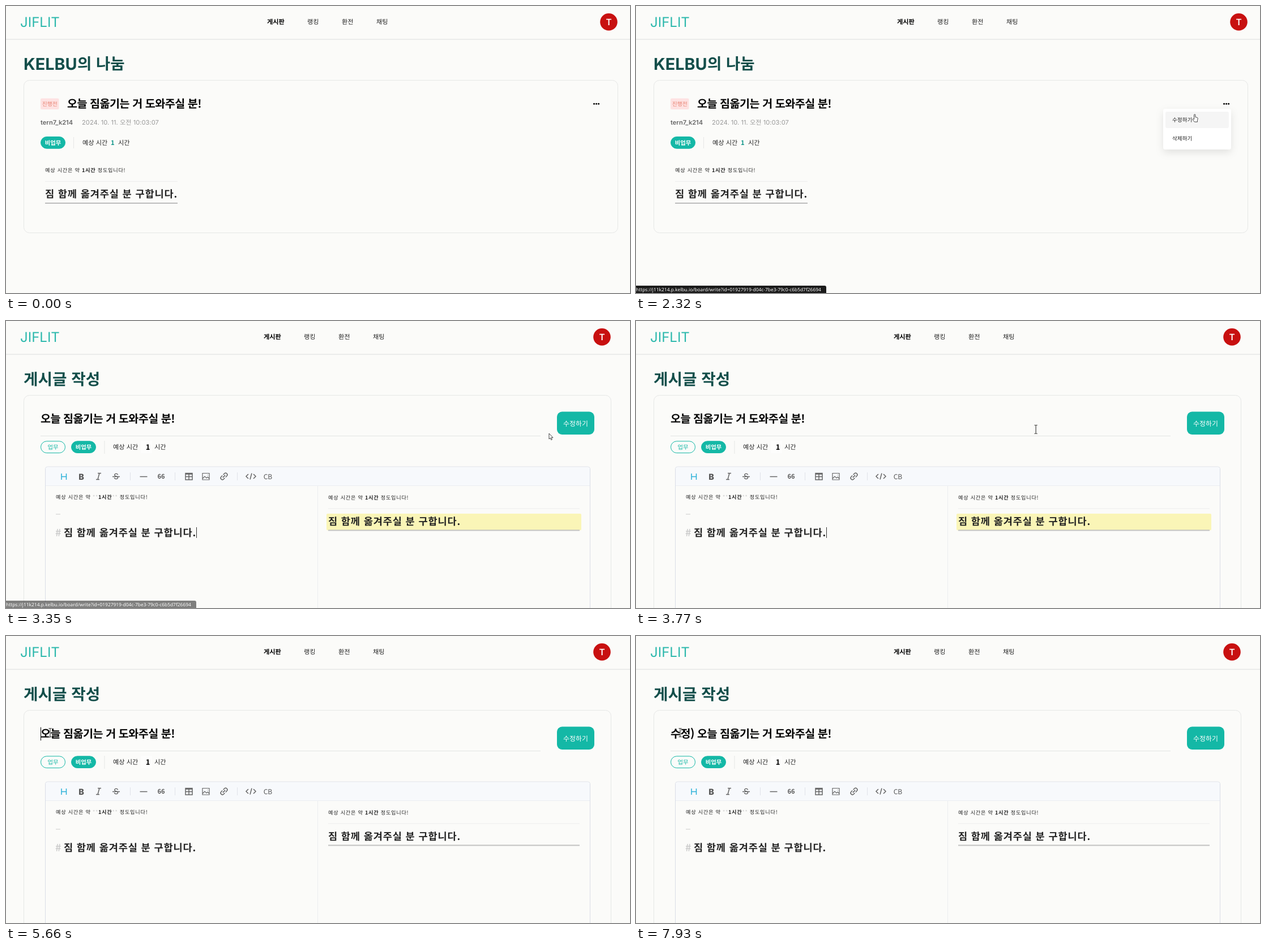
An HTML page that plays this animation: 1102 by 508 pixels, repeating every 8000 ms.

```html
<!DOCTYPE html>
<html lang="ko">
<head>
<meta charset="utf-8">
<style>
  html, body { margin: 0; width: 100%; height: 100%; overflow: hidden; background: #fbfbf9; }
  svg { display: block; width: 1102px; height: 508px; }
  text { font-family: "Noto Sans CJK KR", "Noto Sans CJK", sans-serif; text-rendering: geometricPrecision; }
  .latin { font-family: Inter, "Noto Sans CJK KR", "Noto Sans CJK", sans-serif; }
  .url { font-family: "Noto Sans", "Open Sans", sans-serif; }
  .title { font-weight: 700; letter-spacing: -.5px; }
  .icon { fill: none; stroke: #666; stroke-width: 1.5; }
  .pointer { fill: #fff; stroke: #333; stroke-width: .9; stroke-linejoin: round; }
  #ibeam { mix-blend-mode: difference; }
  #click { mix-blend-mode: multiply; }
</style>
</head>
<body>
<svg id="stage" viewBox="0 0 1102 508" xmlns="http://www.w3.org/2000/svg"></svg>
<script>
const LOOP = 8000, STEP = 70;
const TEAL = '#14b8a6', DARK_TEAL = '#134e4a', RULE = '#e6e7e6';
const POST_TITLE = '오늘 짐옮기는 거 도와주실 분!';
const HEADING = '짐 함께 옮겨주실 분 구합니다.';

// Text is placed by the middle of its glyphs.
const text = (x, midY, size, content, color = '#222', extra = '') =>
  `<text x="${x}" y="${midY + size * .38}" font-size="${size}" fill="${color}" ${extra}>${content}</text>`;
const bold = 'font-weight="700"';
const centered = 'text-anchor="middle"';
const rect = (x, y, w, h, fill, extra = '') =>
  `<rect x="${x}" y="${y}" width="${w}" height="${h}" fill="${fill}" ${extra}/>`;
const outline = (x, y, w, h, r, color = RULE) =>
  rect(x, y, w, h, 'none', `rx="${r}" stroke="${color}"`);
const group = (id, content) => `<g id="${id}">${content}</g>`;

const pill = (x, y, label, filled) =>
  rect(x + .5, y + .5, 43, 20.7, filled ? TEAL : 'none', `rx="10.35" stroke="${TEAL}"`) +
  text(x + 22, y + 10.8, 10.3, label, filled ? '#fff' : TEAL, `${centered} ${filled ? bold : ''}`);

const sentence = (x, y, mark = '') => {
  const stars = mark && `<tspan fill="#ccc" font-weight="400">${mark}</tspan>`;
  return text(x, y, 9.2,
    `예상 시간은 약 ${stars}<tspan font-weight="700">1시간</tspan>${stars} 정도입니다!`,
    '#222', 'letter-spacing=".72"');
};
const heading = (x, y) => text(x, y, 17.6, HEADING, '#222', `${bold} letter-spacing=".85"`);

const nav = group('nav',
  text(461, 28, 11.2, '게시판', '#000', bold) +
  ['랭킹', '환전', '채팅'].map((label, i) => text(532 + 61 * i, 28, 11.2, label)).join(''));
const avatar = group('avatar',
  '<circle cx="1064.5" cy="28.3" r="15.3" fill="#c81010"/>' +
  text(1064.5, 28.2, 15.5, 'T', '#fff', `class="latin" font-weight="600" ${centered}`));
const header =
  text(25, 28, 24, 'JIFLIT', '#2bb8ac', 'class="latin" font-weight="400"') + nav + avatar +
  rect(0, 58.5, 1102, 1, '#dcdedd');

const menu = group('menu',
  rect(931, 182, 120, 72, '#fff', 'rx="4" filter="url(#shadow)"') +
  group('hover', rect(935, 187, 112, 29, '#f5f5f5', 'rx="3"')) +
  text(947, 201.5, 9.6, '수정하기') + text(947, 234, 9.6, '삭제하기'));

const viewPage = group('view',
  text(31, 102, 28.8, 'KELBU', DARK_TEAL, `class="latin" ${bold}`) +
  text(126, 102, 27.5, '의 나눔', DARK_TEAL, bold) +
  outline(31.5, 131.5, 1049, 270, 10) +
  rect(61, 163.5, 32.5, 19.5, '#fee2e2', 'rx="2"') +
  text(77.3, 173.3, 9.8, '진행전', '#e88474', centered) +
  text(108, 173, 19.6, POST_TITLE, '#000', 'class="title"') +
  [1038.6, 1042.6, 1046.6].map(x => `<circle cx="${x}" cy="173.2" r="1.45"/>`).join('') +
  text(61, 206, 11.1, 'tern7_k214', '#666', 'class="latin" font-weight="600"') +
  text(134, 206, 11.2, '2024. 10. 11. 오전 10:03:07', '#999', 'class="latin"') +
  pill(61, 231, '비업무', true) + rect(119, 232, 1, 20, RULE) +
  text(135, 242, 11.2, '예상 시간') + text(185, 242, 11.2, '1', '#0d9488', bold) + text(198, 242, 11.2, '시간') +
  sentence(69, 291) + rect(69, 310, 234, 1, '#ededed') +
  heading(69, 332) + rect(69, 348, 234, 2, '#bdbdbd') + menu);

const label = (x, size, content, extra = '') => text(x, 275, size, content, '#555', `${centered} ${extra}`);
const toolbar =
  '<path class="icon" style="stroke:#2bb1d8" d="M98 270v11M106.5 270v11M98 275.5h8.5"/>' +
  label(133, 14.5, 'B', 'class="latin" font-weight="800"') +
  '<path class="icon" d="M162 269.5h6M159 280.5h6M165 269.5l-3 11"/>' +
  label(194.5, 14, 'S', 'class="latin"') + '<path class="icon" d="M188 275.5h13"/>' +
  '<path class="icon" d="M236.5 275.5h13"/>' +
  label(274, 11, '66', bold) +
  '<path class="icon" d="M317 269.5h12v11.5h-12zM317 271h12M317 275.5h12M323 271v10"/>' +
  '<path class="icon" style="stroke-width:1.2" d="M347 269.5h12v11.5h-12zM347 279l4-4 3 3 2-2 3 3M355.5 272.5h1"/>' +
  '<g transform="rotate(-45 385 275)"><path class="icon" d="M384 272h-3a3 3 0 0 0 0 6h3M386 272h3a3 3 0 0 1 0 6h-3M382 275h6"/></g>' +
  '<path class="icon" d="M428 271l-4 4 4 4M437 271l4 4-4 4M434 269.5l-3 11"/>' +
  label(462.5, 12, 'CB', 'font-weight="500"') +
  [219, 298, 408].map(x => rect(x, 268, 1, 14, '#e1e3e9')).join('');

const editor = group('editor',
  '<path d="M69.5 520V262q0-4 4-4H1027.5q4 0 4 4V520" fill="none" stroke="#dadde6"/>' +
  '<path d="M70 291V262q0-3.5 3.5-3.5H1027.5q3.5 0 3.5 3.5V291z" fill="#f7f9fc"/>' +
  rect(70, 291, 961, 1, '#ebedf2') + rect(550, 291, 1, 217, '#eceef0') + toolbar +
  sentence(88, 312, '**') + rect(88, 341.5, 8, 1, '#ccc') +
  text(87, 374, 17.6, '#', '#ccc', bold) + heading(102, 374) +
  group('editorCaret', rect(336, 365, 1, 19, '#333')) +
  sentence(569, 312.5) + rect(569, 331.5, 444, 1, '#ededed') +
  group('mark', rect(566, 341, 450, 29.5, '#faf5b7', 'rx="2"')) +
  heading(569, 354) + rect(569, 369.5, 444, 2, '#c2c2c2'));

const editPage = group('edit',
  text(31, 102, 27.7, '게시글 작성', DARK_TEAL, bold) +
  '<rect id="card" x="31.5" y="131.5" rx="10" fill="none" stroke="#e6e7e6"/>' +
  text(61, 173, 19.6, POST_TITLE, '#000', 'class="title" id="title"') +
  '<rect id="composing" y="184" height="1"/><rect id="titleCaret" y="161.5" width="1" height="23.5"/>' +
  '<rect id="titleRule" x="61" y="203" height="1" fill="#e3e4e4"/>' +
  group('submit', rect(973, 160.5, 66, 40.5, TEAL, 'rx="9"') +
    text(1006, 181, 11.9, '수정하기', '#fff', `${centered} font-weight="500"`)) +
  pill(61, 212.3, '업무', false) + pill(115, 212.3, '비업무', true) + rect(173.5, 212, 1, 23, RULE) +
  text(189, 223, 11.2, '예상 시간') + rect(238, 212, 20, 22, '#fdfdfc') +
  text(250.5, 223, 13, '1', '#000', `${bold} ${centered}`) + text(262, 223, 11.2, '시간') + editor);

const status = group('status',
  '<path d="M0 495H333q3 0 3 3V508H0z" fill="#1b1b1b"/>' +
  text(0, 502.2, 8.4, 'https://j11k214.p.kelbu.io/board/write?id=01927919-d04c-7be3-79c0-c6b5d7f26694', '#fff', 'class="url"'));

const pointer = group('pointer',
  '<circle id="click" cx="1" cy="1" r="9.5" fill="#f7ec3c"/>' +
  '<path id="arrow" class="pointer" d="M0 0V10L2.3 8 3.8 11.5 5.4 10.8 4 7.4H7z"/>' +
  '<path id="hand" class="pointer" d="M0 1.2a1.1 1.1 0 0 1 2.2 0V5l3 .7q1.6.4 1.4 2L5.8 11V13.5H.8L-3 9q.4-1.6 3-.2z"/>' +
  '<path id="ibeam" fill="none" stroke="#ddd" d="M-2.5-7.5h2l.5.5.5-.5h2M0-7V7M-2.5 7.5h2l.5-.5.5.5h2"/>');

const stage = document.getElementById('stage');
stage.innerHTML =
  '<defs><filter id="shadow" x="-30%" y="-40%" width="160%" height="190%">' +
  '<feDropShadow dx="0" dy="5" stdDeviation="7" flood-opacity=".1"/></filter></defs>' +
  header + viewPage + editPage + status + pointer;

const parts = Object.fromEntries([...stage.querySelectorAll('[id]')].map(el => [el.id, el]));
const show = (id, on) => { parts[id].style.display = on ? '' : 'none'; };
const attr = (id, values) => { for (const k in values) parts[id].setAttribute(k, values[k]); };
const shift = (id, x, y = 0) => attr(id, { transform: `translate(${x} ${y})` });
const within = (t, ...spans) => spans.some(([from, to]) => t >= from && t < to);

// [start, end, x, y]: the pointer eases to x, y between start and end.
const MOVES = [
  [660, 660, 1000, 488], [660, 1360, 1048.5, 174], [1830, 2600, 963, 198], [2730, 2730, 964, 198],
  [3280, 3350, 959, 199], [3350, 4460, 76, 174], [4590, 4660, 72, 169], [5130, 5330, 78, 171],
];
const TYPED = [
  [0, ''], [6060, 'ㅅ'], [6130, '수'], [6200, '숮'], [6330, '수저'], [6400, '수정'],
  [6600, '수정))'], [7060, '수정)'], [7400, '수정) '],
];
const ease = p => p < .5 ? 2 * p * p : 1 - 2 * (1 - p) ** 2;

function pointerAt(t) {
  let pos = [1000, 488];
  for (const [start, end, x, y] of MOVES) {
    if (t < start) break;
    const stepped = Math.floor((t - start) / STEP) * STEP;
    const p = t >= end ? 1 : ease(stepped / (end - start));
    pos = [pos[0] + (x - pos[0]) * p, pos[1] + (y - pos[1]) * p];
  }
  return pos;
}

function drawTitle(t) {
  const prefix = TYPED.filter(([at]) => t >= at).pop()[1];
  const value = prefix + POST_TITLE;
  if (parts.title.textContent !== value) parts.title.textContent = value;
  const xAfter = n => 61 + (n > 0 ? parts.title.getSubStringLength(0, n) : 0);
  const count = t < 5130 ? 1 : prefix.length;
  show('titleCaret', within(t, [4730, 5130], [5660, 7930]));
  attr('titleCaret', { x: Math.round(xAfter(count)) });
  show('composing', within(t, [6060, 6600]));
  const left = xAfter(count - 1);
  attr('composing', { x: left, width: Math.max(0, xAfter(count) - left) });
}

function draw(t) {
  const editing = t >= 3000, loaded = t >= 3280;
  show('view', !editing);
  show('edit', editing);
  show('editor', loaded);
  shift('nav', loaded ? -6 : 0);
  shift('avatar', loaded ? -12 : 0);
  shift('submit', loaded ? 0 : 12);
  attr('card', { width: loaded ? 1037 : 1049, height: loaded ? 420 : 134 });
  attr('titleRule', { width: loaded ? 883 : 895 });
  if (editing) drawTitle(t);

  show('menu', within(t, [1560, 3000]));
  show('hover', t >= 2180);
  show('status', within(t, [2320, 3420]));
  parts.status.style.opacity = t >= 3350 ? .55 : 1;
  show('mark', t < 4800);
  show('editorCaret', within(t, [3280, 3800], [4330, 4800]));

  const [x, y] = pointerAt(t);
  const hand = within(t, [1290, 1900], [2180, 3280]);
  const ibeam = loaded && x < 944 && y < 202;
  show('pointer', t >= 660);
  shift('pointer', x, y);
  show('hand', hand);
  show('ibeam', ibeam);
  show('arrow', !hand && !ibeam);
  show('click', within(t, [1490, 1630], [2930, 3000], [4730, 4860]));
}

const start = performance.now();
function tick() {
  draw((performance.now() - start) % LOOP);
  requestAnimationFrame(tick);
}
tick();
</script>
</body>
</html>
```
